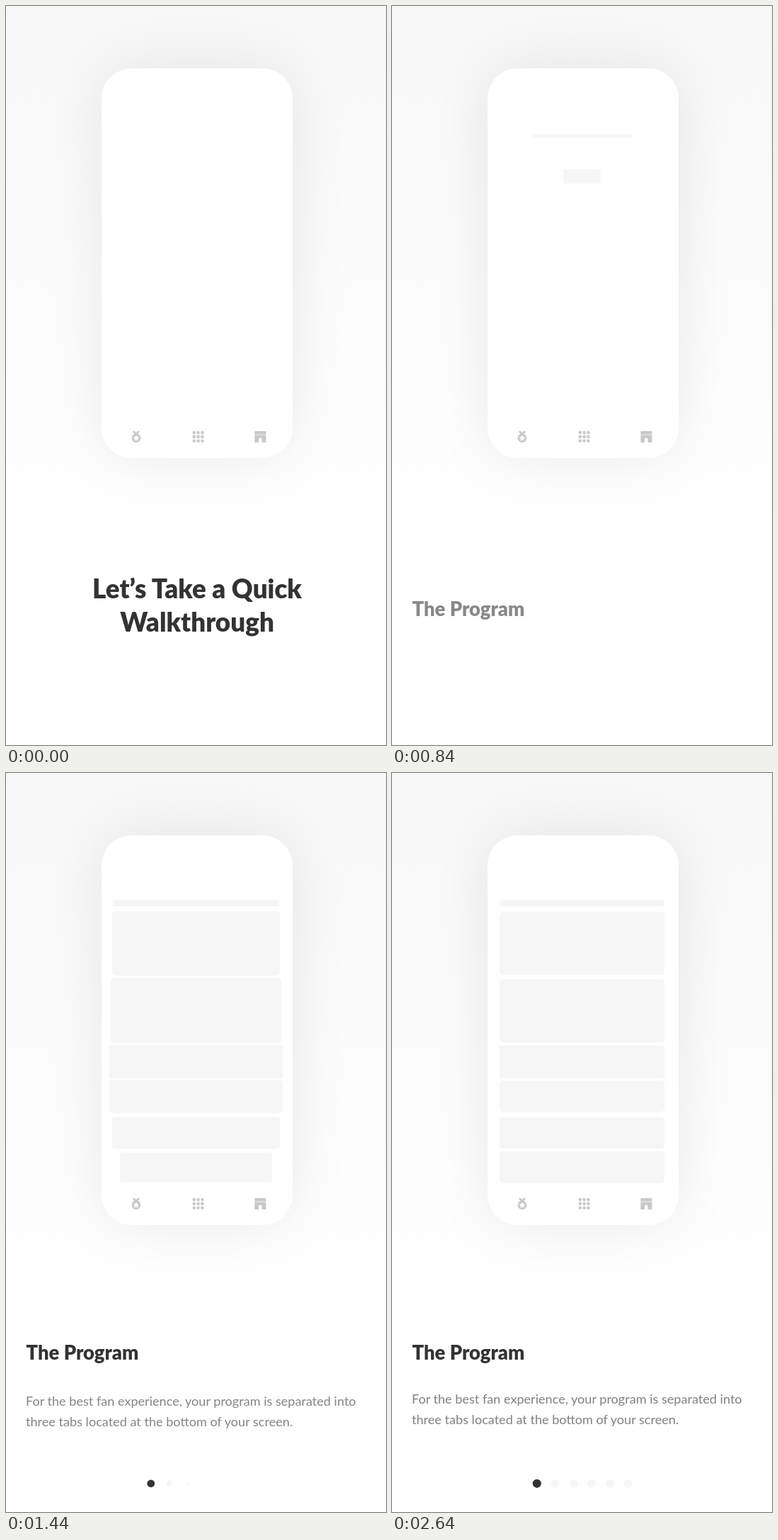
Write an HTML page that moves like this. It is 537x1043 px and loops after 2.68 s.

```html
<!DOCTYPE html>
<html lang="en">
<head>
<meta charset="utf-8">
<title>Walkthrough</title>
<style>
  html, body { margin: 0; width: 100%; height: 100%; overflow: hidden; background: #fff; }
  svg { display: block; width: 100%; height: 100%; }
  text { font-family: Lato, "Open Sans", sans-serif; fill: #333; }
  .title { font-size: 36.8px; font-weight: 900; text-anchor: middle; }
  .heading { font-size: 27.4px; font-weight: 900; }
  .body text { font-size: 18.1px; fill: #808080; }
  .icons { fill: #c9c9c9; }
</style>
</head>
<body>
<svg viewBox="0 0 537 1043">
  <defs>
    <linearGradient id="sky" x1="0" y1="0" x2="0" y2="752" gradientUnits="userSpaceOnUse">
      <stop offset="0" stop-color="#f7f7f7"/>
      <stop offset="1" stop-color="#fff"/>
    </linearGradient>
    <filter id="soft" filterUnits="userSpaceOnUse" x="-60" y="-80" width="660" height="900">
      <feGaussianBlur stdDeviation="42"/>
    </filter>
  </defs>

  <rect width="537" height="1043" fill="url(#sky)"/>
  <rect x="135" y="88" width="270" height="550" rx="42" opacity=".08" filter="url(#soft)"/>
  <rect x="135" y="88" width="270" height="550" rx="42" fill="#fff"/>

  <g id="bars" fill="#f6f6f6"></g>

  <g class="icons">
    <g id="medal">
      <circle cx="184" cy="609.7" r="6.3"/>
      <path d="M178.6 600h3.4l2.6 3.6-2.2 2zM185.9 600h3.5l-4.6 6.2-4.2-.4z"/>
      <path fill="#fff" d="M184 605.3l1.3 2.9 3.1.4-2.3 2.1.6 3.1-2.7-1.5-2.7 1.5.6-3.1-2.3-2.1 3.1-.4z"/>
    </g>
    <g id="grid"></g>
    <g id="store">
      <path d="M351.4 600h16v16h-5.9v-4.2a2.2 2.2 0 0 0-4.4 0v4.2h-5.7z"/>
      <path d="M351.4 604.6q2 2 4 0q2 2 4 0q2 2 4 0q2 2 4 0" fill="none" stroke="#fff" stroke-width=".8"/>
    </g>
  </g>

  <text class="title" x="270" y="836">Let’s Take a Quick</text>
  <text class="title" x="270" y="883">Walkthrough</text>
  <text class="heading" x="28.5" y="828">The Program</text>
  <g class="body">
    <text x="28" y="890">For the best fan experience, your program is separated into</text>
    <text x="28" y="918.5">three tabs located at the bottom of your screen.</text>
  </g>

  <g id="dots"></g>
</svg>

<script>
const LOOP = 2680, STEP = 40, STAGGER = 80, TRAVEL = 79;
const BARS_START = 680, DOTS_START = 1180;

// Springy scale, one value per 40 ms.
const POP = [0, .04, .227, .43, .6, .738, .845, .923, .98, 1.02, 1.042, 1.051,
  1.053, 1.05, 1.045, 1.038, 1.029, 1.02, 1.015, 1.01, 1.007, 1.004, 1.002, 1];

const $ = selector => document.querySelector(selector);
const clamp = v => Math.min(1, Math.max(0, v));
const easeIn = v => clamp(v) ** 3;
const easeOut = v => 1 - (1 - clamp(v)) ** 4;

function add(parent, tag, attrs) {
  const el = document.createElementNS("http://www.w3.org/2000/svg", tag);
  for (const key in attrs) el.setAttribute(key, attrs[key]);
  return parent.appendChild(el);
}

function pop(age) {
  const pos = clamp(age / STEP / (POP.length - 1)) * (POP.length - 1);
  const i = Math.min(Math.floor(pos), POP.length - 2);
  return POP[i] + (POP[i + 1] - POP[i]) * (pos - i);
}

for (let i = 0; i < 9; i++) {
  add($("#grid"), "circle", { cx: 265.8 + (i % 3) * 5.8, cy: 602.1 + Math.floor(i / 3) * 5.8, r: 2.3 });
}

// Top, height, corner radius
const bars = [
  [179, 9, 4.5], [196, 89, 5], [291, 89, 5], [385, 45, 0],
  [434, 44.5, 5], [486, 44, 5], [534, 45, 5]
].map(([y, h, rx]) => ({
  x: 268.5, y: y + h / 2,
  el: add($("#bars"), "rect", { x: -116.5, y: -h / 2, width: 233, height: h, rx })
}));

const dots = Array.from({ length: 6 }, (_, i) => ({
  x: 204.8 + i * 25.8, y: 1002.8,
  el: add($("#dots"), "circle", { r: 6.1, fill: i ? "#f6f6f6" : "#333" })
}));

function popAll(items, age) {
  items.forEach(({ x, y, el }, i) => {
    const scale = pop(age - i * STAGGER);
    el.setAttribute("visibility", scale > 0 ? "visible" : "hidden");
    el.setAttribute("transform", `translate(${x} ${y}) scale(${scale})`);
  });
}

// drop 0 is at rest and opaque, 1 is fully lowered and clear
function place(el, drop) {
  el.setAttribute("transform", `translate(0 ${TRAVEL * drop})`);
  el.setAttribute("opacity", 1 - drop);
}

const [line1, line2] = document.querySelectorAll(".title");

function draw(time) {
  const t = Math.floor((time % LOOP) / STEP) * STEP;
  place(line2, easeIn((t - 25) / 500));
  place(line1, easeIn((t - 105) / 500));
  place($(".heading"), 1 - easeOut((t - 650) / 970));
  place($(".body"), 1 - easeOut((t - 900) / 970));
  popAll(bars, t - BARS_START);
  popAll(dots, t - DOTS_START);
}

const start = performance.now();
function tick() {
  draw(performance.now() - start);
  requestAnimationFrame(tick);
}
tick();
</script>
</body>
</html>
```
